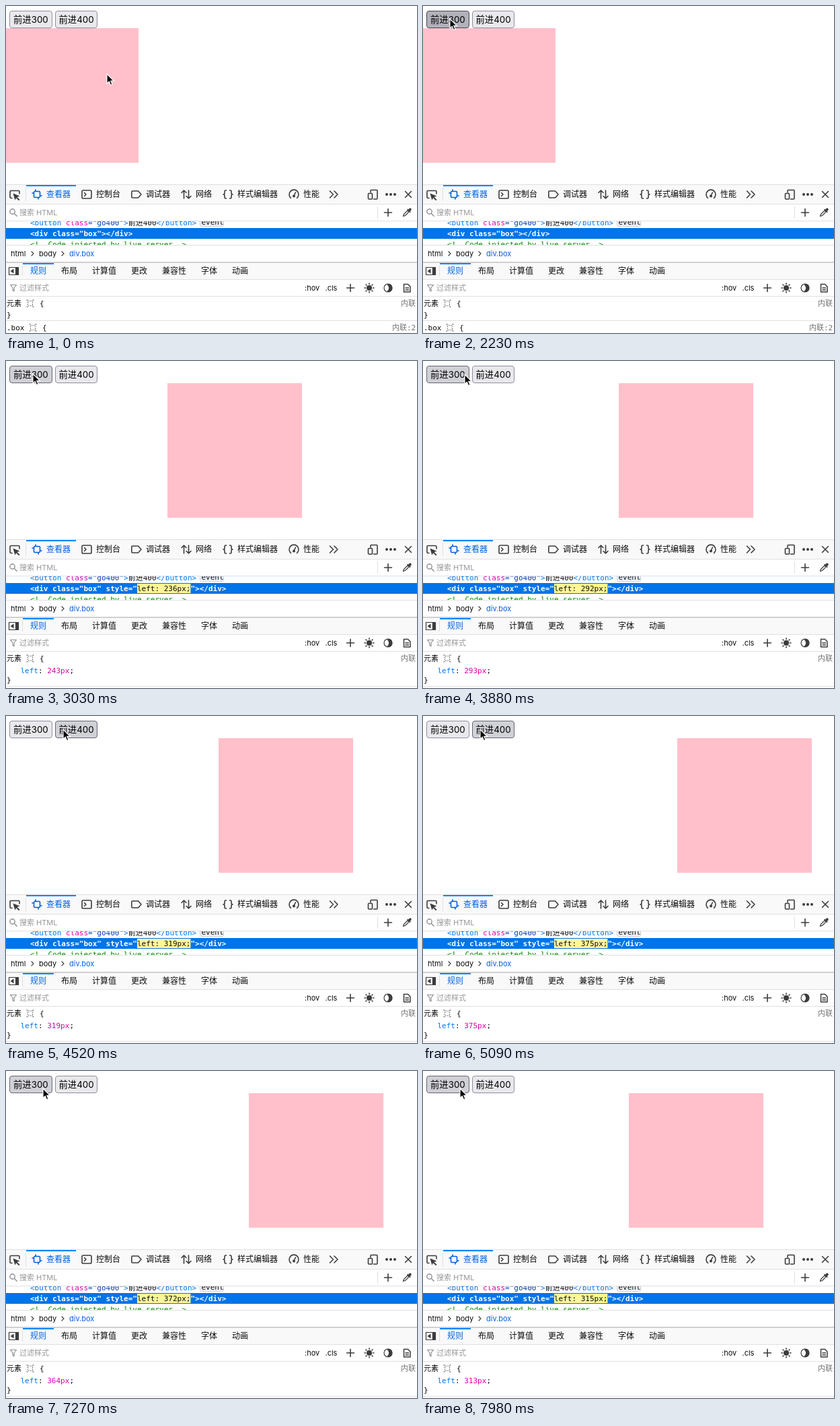
Animation, 611 px wide and 486 px high, one loop 8 s. Source, as an HTML page:

```html
<!DOCTYPE html>
<html lang="zh">
<head>
<meta charset="utf-8">
<title>缓动动画</title>
<style>
html, body { margin: 0; width: 100%; height: 100%; overflow: hidden; background: #fff; }
svg { display: block; }
text { white-space: pre; fill: #0c0c0d; }
.ui { font: 11px Inter, "Noto Sans CJK SC", "Noto Sans CJK", sans-serif; }
.tab text { font-size: 12px; }
.code text { font: 11px "DejaVu Sans Mono", "Noto Sans CJK SC", "Noto Sans CJK", monospace; }
.btn rect { fill: #e9e9ed; stroke: #8f8f9d; }
.btn text { font-size: 13.333px; fill: #000; }
.btn.hover rect { fill: #d0d0d7; stroke: #676774; }
.btn.down rect { fill: #b1b1b9; stroke: #484851; }
.line { fill: #e0e0e2; }
.bar { fill: #f9f9fa; }
.icon { fill: none; stroke: #3c3c3e; stroke-width: 1.6; stroke-linejoin: round; stroke-linecap: round; }
.icon .solid { fill: #3c3c3e; stroke: none; }
.thin { stroke-width: 1.2; }
.ui .blue { fill: #0060df; }
.ui .gray { fill: #737373; }
.ui .hint { fill: #97979b; }
.code .tag { fill: #0074e8; }
.code .name { fill: #dd00a9; }
.code .str { fill: #003eaa; }
.code .note { fill: #058b00; }
.code .picked { fill: #fff; font-weight: bold; }
.code .lit { fill: #0c0c0d; font-weight: normal; }
</style>
</head>
<body>
<svg width="611" height="486" viewBox="0 0 611 486" class="ui">
  <defs>
    <clipPath id="tree"><rect y="320" width="611" height="35"/></clipPath>
    <g id="target" class="icon thin"><rect x="1.5" y="1.5" width="7" height="7" stroke-dasharray="1.2 1.6" stroke-linecap="butt"/><path d="M0 0h1M9 0h1M0 10h1M9 10h1"/></g>
    <path id="plus" d="M-5.5 0h11M0-5.5v11"/>
  </defs>

  <rect id="box" y="33" width="200" height="200" fill="#ffc0cb"/>
  <g class="btn"><rect x="5.5" y="7.5" width="63" height="25" rx="3.5"/><text x="11" y="25">前进300</text></g>
  <g class="btn"><rect x="73.5" y="7.5" width="62" height="25" rx="3.5"/><text x="78.5" y="25">前进400</text></g>

  <!-- panel backgrounds -->
  <rect class="bar" y="266" width="611" height="28"/>
  <rect class="bar" y="382" width="611" height="24"/>
  <g class="line">
    <rect y="265" width="611" height="1"/><rect y="294" width="611" height="1"/>
    <rect y="319" width="611" height="1"/><rect y="355" width="611" height="1"/>
    <rect y="380" width="611" height="2" fill="#d0d0d3"/><rect y="406" width="611" height="1"/>
    <rect y="431" width="611" height="1"/>
    <rect x="29" y="270" width="1" height="20"/><rect x="552" y="298" width="1" height="18"/>
    <rect x="24" y="386" width="1" height="16"/>
  </g>
  <rect x="30" y="266" width="74" height="2" fill="#0a84ff"/>
  <rect x="25" y="382" width="46" height="2" fill="#0a84ff"/>

  <!-- main tabs -->
  <g class="tab">
    <text class="blue" x="60" y="284">查看器</text><text x="134" y="284">控制台</text>
    <text x="208" y="284">调试器</text><text x="282" y="284">网络</text>
    <text x="344" y="284">样式编辑器</text><text x="442" y="284">性能</text>
    <text class="blue" x="36" y="398">规则</text><text x="82" y="398">布局</text>
    <text x="128" y="398">计算值</text><text x="186" y="398">更改</text>
    <text x="232" y="398">兼容性</text><text x="290" y="398">字体</text>
    <text x="336" y="398">动画</text>
  </g>
  <g class="icon">
    <path d="M9 285.5H7.500Q6 285.500 6 284V276Q6 274.500 7.500 274.500H18.500Q20 274.500 20 276V279"/>
    <path class="solid" d="M10.500 278.500l10 4-4 1.600 4 3.600-1.400 1.500-4-4-1.800 3.300z"/>
    <g stroke="#0060df"><rect x="41.500" y="275.500" width="9" height="9" rx="1.500"/><path d="M44 273v2M48 285v2M39 278h2M51 282h2"/></g>
    <rect x="113" y="274" width="14" height="12" rx="1.800"/><path d="M116.500 277.500l2.500 2.500-2.500 2.500"/>
    <path d="M188 275h8.500l4.500 5-4.500 5h-8.500q-1.200 0-1.200-1.200v-7.600q0-1.200 1.200-1.200z"/>
    <path d="M264.500 286v-12l-3.500 3.500M264.500 274l3.500 3.500M271.500 274v12l-3.500-3.500M271.500 286l3.500-3.500"/>
    <path d="M327.500 274h-1q-1.500 0-1.500 1.500v2.500q0 2-2 2 2 0 2 2v2.500q0 1.500 1.500 1.500h1M332.500 274h1q1.500 0 1.500 1.500v2.500q0 2 2 2-2 0-2 2v2.500q0 1.500-1.500 1.500h-1"/>
    <path d="M423.500 285.500a7 7 0 1 1 9 0M428 282l2.500-5"/><circle class="solid" cx="428" cy="282.500" r="2"/>
    <path d="M481.500 275l5 5-5 5M488 275l5 5-5 5"/>
    <path d="M542 277v-2.500q0-1 1-1h8q1 0 1 1v11.500q0 1-1 1h-4.500"/><rect x="538.500" y="278.500" width="6" height="8.500" rx="1"/>
    <g class="solid"><circle cx="566" cy="280" r="2"/><circle cx="572" cy="280" r="2"/><circle cx="578" cy="280" r="2"/></g>
    <path d="M593.500 275.500l9 9M602.500 275.500l-9 9"/>
    <use href="#plus" x="568" y="307"/>
    <path class="thin" d="M590.500 312.500l1-3 5.500-5.500 2 2-5.500 5.500z"/><path class="solid" d="M596 302.500l1.200-1 1 1 1.300-1.600q1.500-1.200 2.700.1t0 2.700l-1.500 1.300 1 1-1 1.200z"/>
    <g stroke="#8f8f94" stroke-width="1.400"><circle cx="9.500" cy="305.500" r="3.700"/><path d="M12.500 308.500l3.700 3.700"/></g>
  </g>
  <text class="hint" x="20" y="311">搜索 HTML</text>

  <!-- document tree -->
  <g class="code" clip-path="url(#tree)">
    <text x="36" y="326"><tspan class="tag">&lt;button </tspan><tspan class="name">class</tspan><tspan class="str">="go400"</tspan><tspan class="tag">&gt;</tspan>前进400<tspan class="tag">&lt;/button&gt;</tspan></text>
    <rect x="288.500" y="315.500" width="35" height="12" rx="2" fill="#f0f0f4" stroke="#cfcfd8"/>
    <text x="290.500" y="325">event</text>
    <text class="note" x="36" y="358">&lt;!--Code injected by live-server--&gt;</text>
    <rect y="330" width="611" height="16" fill="#0074e8"/>
    <rect id="flash" x="195" y="331" height="14" fill="#fff697"/>
    <text class="picked" x="36" y="342">&lt;div class="box"<tspan id="pre"></tspan><tspan id="attr"></tspan><tspan id="post"></tspan>&gt;&lt;/div&gt;</text>
  </g>
  <text x="7" y="372">html</text><text x="49" y="372">body</text><text class="blue" x="94" y="372">div.box</text>
  <g class="icon thin" stroke="#8f8f94"><path d="M38 365l3 3-3 3M83 365l3 3-3 3"/></g>

  <!-- rules pane -->
  <g class="icon thin">
    <rect x="4.500" y="388.500" width="14" height="11"/><path d="M14.500 389v10"/><path class="solid" d="M11.500 390.500v7l-5-3.500zM15 389h3v10h-3z"/>
    <path stroke="#8f8f94" d="M6.500 414.500h9l-3.500 4.500v5l-2-1.500v-3.500z"/>
    <use href="#plus" x="512" y="419" stroke-width="1.600"/>
    <circle class="solid" cx="540" cy="419" r="4"/><path stroke-width="1.600" d="M540 412v1.500M540 424.500v1.500M533 419h1.500M545.500 419h1.500M535 414l1 1M544 423l1 1M545 414l-1 1M536 423l-1 1"/>
    <circle cx="568" cy="419" r="6"/><path class="solid" d="M566 413.500q6.500 5.500 0 11a6 6 0 1 0 2-11.500z"/>
    <path stroke-width="1.500" d="M591.500 413.500h6l3.500 3.500v8h-9.500zM594 419h4.500M594 422h4.500"/>
  </g>
  <text class="hint" x="20" y="423">过滤样式</text>
  <text x="444" y="423">:hov</text><text x="474.500" y="423">.cls</text>
  <g class="code">
    <text x="1" y="446">元素</text><use href="#target" x="31" y="437"/><text x="50" y="446">{</text>
    <text class="gray" x="587" y="446">内联</text>
    <g id="empty">
      <text x="1" y="463">}</text><rect class="line" y="467" width="611" height="1"/>
      <text x="1" y="482">.box</text><use href="#target" x="35" y="473"/><text x="54" y="482">{</text>
      <text class="gray" x="574" y="482">内联:2</text>
    </g>
    <g id="filled">
      <text x="21.500" y="464"><tspan class="tag">left</tspan>: <tspan id="rule" class="name"></tspan>;</text>
      <text x="1" y="478">}</text><rect class="line" y="483" width="611" height="1"/>
    </g>
  </g>

  <g id="cursor">
    <path id="arrow" d="M1 1V15.200l3.300-3 2.200 5.300 2.500-1-2.200-5.200H11.200z" stroke="#fff" stroke-width="1.200"/>
    <g id="beam" fill="none"><path id="stem" d="M-3-8.500q3 0 3 2v13q0 2-3 2M3-8.500q-3 0-3 2v13q0 2 3 2M-1.500 3h3" stroke="#fff" stroke-width="2.600"/><use href="#stem" style="stroke:#000"/><path d="M-3-8.500q3 0 3 2v13q0 2-3 2M3-8.500q-3 0-3 2v13q0 2 3 2M-1.500 3h3" stroke="#000" stroke-width="1.200"/></g>
  </g>
</svg>
<script>
const LOOP = 8000, CHAR = 6.62;
const $ = id => document.getElementById(id);
const buttons = document.querySelectorAll('.btn');

// The inspector rows trail the page: attr and rule scale the step count.
const runs = [
  { start: 2275, tick: 50, from: 0, to: 300, attr: .94, rule: .97 },
  { start: 4381, tick: 50.5, from: 300, to: 400, attr: .85, rule: .89 },
  { start: 7025, tick: 50, from: 400, to: 300, attr: .85, rule: .89 }
];
const presses = [[2230, 2325], [4290, 4390], [6910, 7025]];
const path = [
  [0, 149, 100], [110, 149, 100], [230, 142, 100], [800, 142, 100],
  [1290, 45, 30], [1440, 45, 30], [1760, 39, 18], [3560, 39, 18],
  [3880, 61, 19], [3900, 61, 19], [4230, 84, 19], [6300, 84, 19],
  [6480, 68.5, 26], [6550, 68.5, 26], [6730, 54, 25], [LOOP, 54, 25]
];

// Each tick covers a tenth of the remaining distance, rounded away from zero.
function leftAfter(run, steps) {
  let left = run.from;
  for (let i = 0; i < steps && left !== run.to; i++) {
    const d = (run.to - left) / 10;
    left += d > 0 ? Math.ceil(d) : Math.floor(d);
  }
  return left;
}

function pointer(t) {
  const i = path.findIndex((p, k) => k && t <= p[0]);
  const [t0, x0, y0] = path[i - 1], [t1, x1, y1] = path[i];
  const u = (t - t0) / (t1 - t0), e = u * u * (3 - 2 * u);
  return [x0 + (x1 - x0) * e, y0 + (y1 - y0) * e];
}

const show = (id, on) => $(id).setAttribute('visibility', on ? 'visible' : 'hidden');

function drawBox(t) {
  const run = runs.filter(r => t >= r.start).pop();
  const steps = run ? Math.floor((t - run.start) / run.tick) : 0;
  const styled = steps > 0 || (run && run !== runs[0]);
  const row = k => leftAfter(run, Math.round(steps * k)) + 'px';
  const lit = styled && (t < 6340 || t >= runs[2].start + 50);
  const attr = styled ? `left: ${row(run.attr)};` : '';

  $('box').setAttribute('x', (run ? leftAfter(run, steps) : 0) - 3);
  $('pre').textContent = styled ? ' style="' : '';
  $('attr').textContent = attr;
  $('attr').setAttribute('class', lit ? 'lit' : '');
  $('post').textContent = styled ? '"' : '';
  $('flash').setAttribute('width', attr.length * CHAR);
  show('flash', lit);
  if (styled) $('rule').textContent = row(run.rule);
  show('empty', !styled);
  show('filled', styled);
}

function drawPointer(t) {
  const [x, y] = pointer(t);
  const inRow = y >= 7 && y < 31;
  const over = [inRow && x >= 5 && x < 68, inRow && x >= 73 && x < 136];
  const down = presses.some(([a, b]) => t >= a && t < b);
  buttons.forEach((b, i) => b.setAttribute('class', 'btn' + (over[i] ? down ? ' down' : ' hover' : '')));
  const gap = inRow && x >= 68 && x < 73;
  show('arrow', !gap);
  show('beam', gap);
  $('cursor').setAttribute('transform', `translate(${Math.round(x)} ${Math.round(y)})`);
}

let origin;
function frame(now) {
  origin ??= now;
  const t = (now - origin) % LOOP;
  drawBox(t);
  drawPointer(t);
  requestAnimationFrame(frame);
}
requestAnimationFrame(frame);
</script>
</body>
</html>
```
